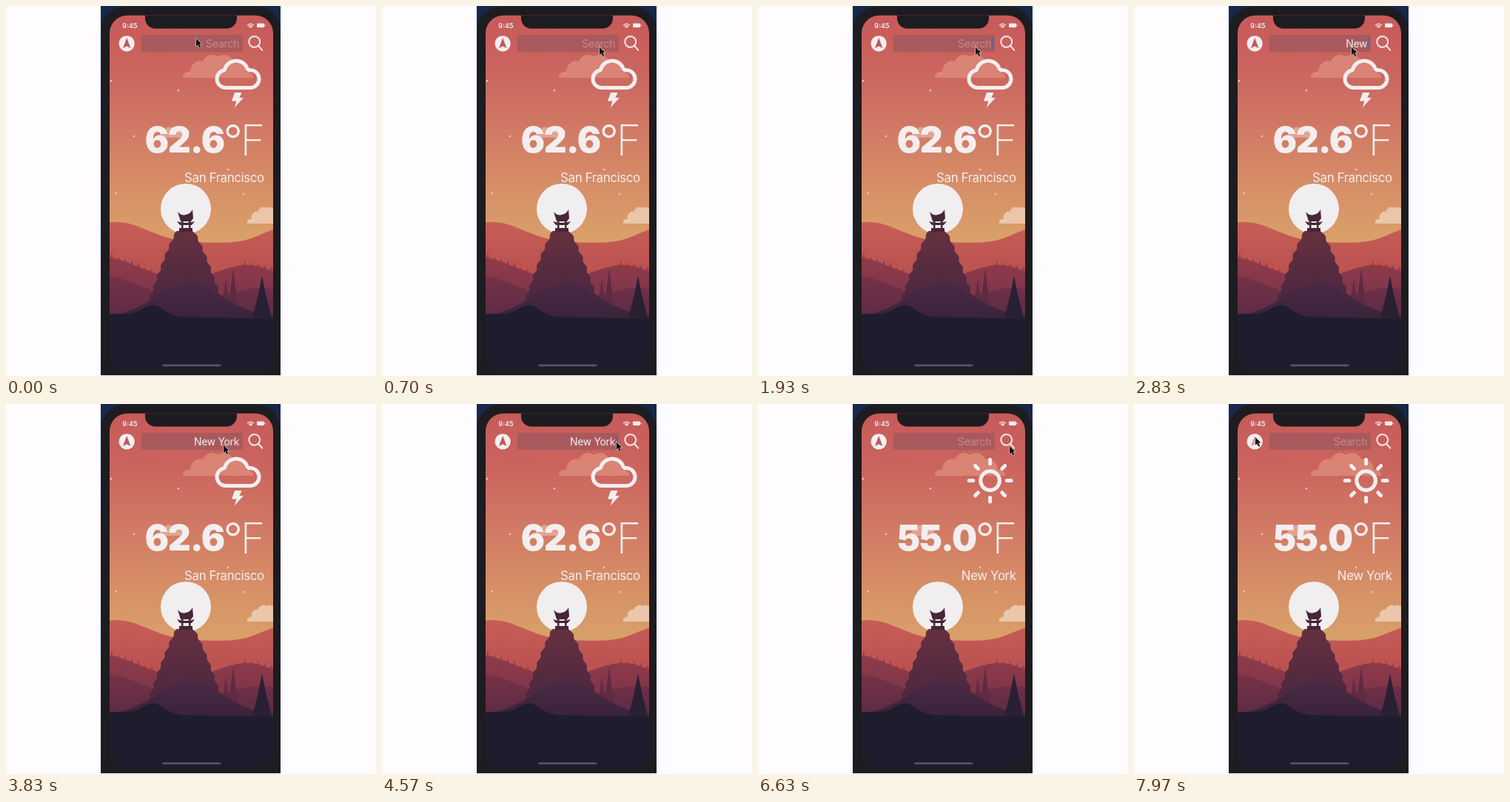
Animation, 500 px wide and 500 px high, one loop 8 s. Source, as an HTML page with a canvas:

```html
<!DOCTYPE html>
<html lang="en">
<head>
<meta charset="utf-8">
<title>Weather search</title>
<style>
html, body { margin: 0; width: 100%; height: 100%; overflow: hidden; background: #fefcfe; }
canvas { display: block; width: 500px; height: 500px; }
</style>
</head>
<body>
<canvas id="stage"></canvas>
<script>
const LOOP = 8000;
const WHITE = '#f3eeef', BODY = '#1d1c20';
const FOCUS = 900, TYPE = 2560, KEY = 105, SUBMIT = 5240, RESULT = 5660, LOCATE = 7900;
const query = 'New York';

const canvas = document.getElementById('stage');
const ctx = canvas.getContext('2d');
const dpr = window.devicePixelRatio || 1;
canvas.width = canvas.height = 500 * dpr;

const clamp = v => Math.max(0, Math.min(1, v));
const ease = p => p * p * (3 - 2 * p);
const bump = (x, center, width) => Math.exp(-(((x - center) / width) ** 2));

function pointerAt(t) {
  let x = 257, y = 44;
  const glide = (from, to, nx, ny) => {
    const p = ease(clamp((t - from) / (to - from)));
    x += (nx - x) * p;
    y += (ny - y) * p;
  };
  glide(60, 620, 294, 55.5);
  glide(4280, 4900, 344, 46);
  glide(5750, 6200, 340, 57);
  glide(7120, 7800, 164, 45);
  return [x, y];
}

function gradient(y0, y1, ...colors) {
  const g = ctx.createLinearGradient(0, y0, 0, y1);
  colors.forEach((c, i) => g.addColorStop(i / (colors.length - 1), c));
  return g;
}

function rounded(x, y, w, h, r, fill) {
  ctx.beginPath();
  ctx.roundRect(x, y, w, h, r);
  ctx.fillStyle = fill;
  ctx.fill();
}

function disc(x, y, r, fill) {
  ctx.beginPath();
  ctx.arc(x, y, r, 0, 2 * Math.PI);
  ctx.fillStyle = fill;
  ctx.fill();
}

function shape(path, fill) {
  ctx.fillStyle = fill;
  ctx.fill(new Path2D(path));
}

function line(width) {
  ctx.strokeStyle = WHITE;
  ctx.lineWidth = width;
  ctx.lineCap = ctx.lineJoin = 'round';
  ctx.beginPath();
}

function text(str, x, y, size, weight, fill = WHITE, spacing = 0) {
  ctx.font = `${weight} ${size}px Inter, Roboto, sans-serif`;
  ctx.letterSpacing = spacing + 'px';
  ctx.textAlign = 'right';
  ctx.fillStyle = fill;
  ctx.fillText(str, x, y);
}

// Hill whose skyline is a function of x
function hill(skyline, base, fill) {
  ctx.beginPath();
  ctx.moveTo(139, base);
  for (let x = 139; x <= 363; x += 2) ctx.lineTo(x, skyline(x));
  ctx.lineTo(363, base);
  ctx.fillStyle = fill;
  ctx.fill();
}

// Row of round lobes, tallest in the middle, cut flat at the base
function cloud(left, right, base, height, fill) {
  const lobes = 6, step = (right - left) / lobes;
  ctx.save();
  ctx.beginPath();
  ctx.rect(left, 0, right - left, base);
  ctx.clip();
  ctx.beginPath();
  for (let i = 0; i < lobes; i++) {
    const x = left + step * (i + 0.5);
    const rise = height * Math.sin(Math.PI * (i + 0.5) / lobes);
    const r = Math.min(rise, step * 0.85);
    ctx.moveTo(x + r, base - rise + r);
    ctx.arc(x, base - rise + r, r, 0, 2 * Math.PI);
    ctx.rect(x - r, base - rise + r, 2 * r, rise);
  }
  ctx.fillStyle = fill;
  ctx.fill();
  ctx.restore();
}

function pine(x, top, base, half, fill) {
  shape(`M${x} ${top} Q${x + half * 0.4} ${(top + base) / 2} ${x + half} ${base}
    H${x - half} Q${x - half * 0.4} ${(top + base) / 2} ${x} ${top}Z`, fill);
}

// Steep at the summit, flaring towards the foot, with rough flanks
function mountain() {
  const half = y => 10 + 42 * ((y - 304) / 104) ** 0.82 + 1.2 * Math.sin(y * 0.45);
  ctx.beginPath();
  for (let y = 304; y <= 424; y += 2) ctx.lineTo(243 + half(y), y);
  for (let y = 424; y >= 304; y -= 2) ctx.lineTo(243 - half(y + 3), y);
  ctx.fillStyle = gradient(304, 410, '#66303f', '#572b40', '#482742');
  ctx.fill();
}

function temple() {
  const dark = '#48263a';
  shape('M232 278 Q237 284 243 282 Q249 281 252 275 L253 287 L250 291 H236Z', dark);
  shape('M231 291 Q243 295 255 291 L251 296 H235Z', dark);
  ctx.fillRect(237, 290, 2.5, 15);
  ctx.fillRect(247, 290, 2.5, 15);
  ctx.fillRect(234, 300, 18, 5);
}

function landscape() {
  ctx.fillStyle = gradient(13, 315, '#c75a59', '#cb655e', '#d17965', '#d68d66', '#d9a069');
  ctx.fillRect(139, 11, 224, 415);

  for (const [x, y] of [[142, 101], [233, 114], [173, 176], [300, 221], [149, 253], [321, 254]])
    disc(x, y, 1.3, '#efcbb8');

  cloud(239, 334, 97, 32, '#d98474');
  cloud(204, 242, 178, 15, '#e2a592');
  disc(243, 274, 34, '#f1eef0');
  cloud(326, 378, 294, 23, '#ebc6a9');

  hill(x => 320 - 28 * bump(x, 150, 58) - 19 * bump(x, 372, 38), 430, gradient(293, 370, '#c75d56', '#b9504f'));

  const middle = x => 370 - 31 * bump(x, 130, 65) - 20 * bump(x, 325, 50);
  hill(middle, 430, gradient(338, 420, '#903b49', '#78324a'));
  for (let x = 143; x < 360; x += 9)
    if (x < 205 || x > 322) pine(x, middle(x) - 4 - x % 4, middle(x) + 3, 2, '#8f3b48');

  hill(x => 394 - 29 * bump(x, 135, 60) - 13 * bump(x, 345, 50), 430, gradient(360, 420, '#783247', '#5c2c45'));
  for (let i = 0; i < 2; i++)
    pine(297 + i * 10, 369 - i * 14, 404, 6 + i, '#5f2b42');

  mountain();
  temple();
  hill(x => 420 - 46 * bump(x, 248, 62), 430, gradient(374, 420, '#4b2943', '#3a243b'));
  pine(346, 365, 425, 14, '#2a2033');
  hill(x => 419 + (x - 140) * 0.015 - 3 * bump(x, 150, 40) - 15 * bump(x, 199, 20), 493, '#1f1d2d');
}

function statusBar() {
  text('9:45', 177.5, 29.5, 9, 600);
  for (const r of [2.8, 5.4]) {
    line(1.4);
    ctx.arc(330.5, 29.5, r, -Math.PI * 0.75, -Math.PI * 0.25);
    ctx.stroke();
  }
  disc(330.5, 28.8, 1, WHITE);
  rounded(339, 23.5, 10, 5.5, 1.4, WHITE);
  ctx.fillRect(349.6, 25.2, 1, 2.2);
}

function searchBar(t) {
  const typed = t < SUBMIT ? query.slice(0, Math.max(0, Math.floor((t - TYPE) / KEY) + 1)) : '';
  const focused = t >= FOCUS && t < SUBMIT;

  disc(163.2, 50.8, 10.6, WHITE);
  ctx.globalAlpha = t >= LOCATE ? 0.55 : 1;
  shape('M163.2 43 L168.4 57 L163.2 54.2 L158 57Z', '#bf585a');
  ctx.globalAlpha = 1;

  rounded(183, 39, 137, 23, 3, 'rgba(120,82,96,.4)');
  if (typed) text(typed, 315, 55.7, 13.9, 400, WHITE, -0.3);
  else text('Search', 315.3, 55.7, 14, 400, '#c98786', -0.2);

  const typing = typed && typed.length < query.length;
  const since = t - (typed ? TYPE + KEY * (query.length - 1) : FOCUS);
  if (focused && (typing || since % 1000 < 500)) {
    ctx.fillStyle = '#5c6594';
    ctx.fillRect(316, 43, 1.6, 15);
  }

  const lift = ease(clamp((t - 5380) / 250));
  ctx.globalAlpha = t >= 5160 ? 0.35 + 0.65 * lift : 1;
  line(2);
  ctx.arc(335.7, 48.3, 7.4, 0.8, 0.8 + 2 * Math.PI);
  ctx.lineTo(346.2, 59.6);
  ctx.stroke();
  ctx.globalAlpha = 1;
}

function stormIcon() {
  line(5);
  ctx.arc(297, 98.5, 12, Math.PI / 2, Math.PI * 1.44);
  ctx.arc(311, 90, 16, Math.PI * 1.08, Math.PI * 1.9);
  ctx.arc(330, 98.5, 12, -Math.PI * 0.55, Math.PI / 2);
  ctx.closePath();
  ctx.stroke();
  shape('M309 117 H318.5 L315.5 124 H321 L308.5 137.5 L311.5 128.5 H305Z', WHITE);
}

function sunIcon() {
  ctx.save();
  ctx.translate(313.6, 103.6);
  line(5);
  ctx.arc(0, 0, 12.8, 0, 2 * Math.PI);
  ctx.stroke();
  for (let i = 0; i < 8; i++) {
    line(5);
    ctx.moveTo(22.8, 0);
    ctx.lineTo(28.4, 0);
    ctx.stroke();
    ctx.rotate(Math.PI / 4);
  }
  ctx.restore();
}

function weather(t) {
  const fresh = t >= RESULT;
  if (fresh) sunIcon(); else stormIcon();
  text(fresh ? '55.0' : '62.6', 295, 198, 48, 900, WHITE, -1.2);
  text('F', 350.5, 202, 58, 200);
  text('°', 354 - ctx.measureText('F').width, 202, 58, 300);
  text(fresh ? query : 'San Francisco', 348.7, 238, 16.9, 400, WHITE, -0.4);
}

function cursor(x, y) {
  ctx.save();
  ctx.translate(x, y);
  const arrow = new Path2D('M0 0 V10.5 L2.4 8.4 L4.3 12.6 L6.2 11.8 L4.4 7.6 L7.6 7.4Z');
  line(1);
  ctx.stroke(arrow);
  ctx.fillStyle = '#111';
  ctx.fill(arrow);
  ctx.restore();
}

function draw(now) {
  const t = now % LOOP;
  ctx.setTransform(dpr, 0, 0, dpr, 0, 0);
  ctx.fillStyle = '#fefcfe';
  ctx.fillRect(0, 0, 500, 500);
  ctx.fillStyle = '#16274a';
  ctx.fillRect(128, 0, 243, 499);
  rounded(128.5, 1, 242, 498, [32, 32, 0, 0], BODY);

  ctx.save();
  ctx.beginPath();
  ctx.roundRect(140, 12.7, 221, 479, 24);
  ctx.clip();
  landscape();
  rounded(188, 0, 124, 30.5, 14, BODY);
  statusBar();
  searchBar(t);
  weather(t);
  rounded(211, 484.2, 79.5, 2.8, 1.4, '#57545d');
  ctx.restore();

  cursor(...pointerAt(t));
}

const start = performance.now();
function tick() {
  draw(performance.now() - start);
  requestAnimationFrame(tick);
}
tick();
</script>
</body>
</html>
```
